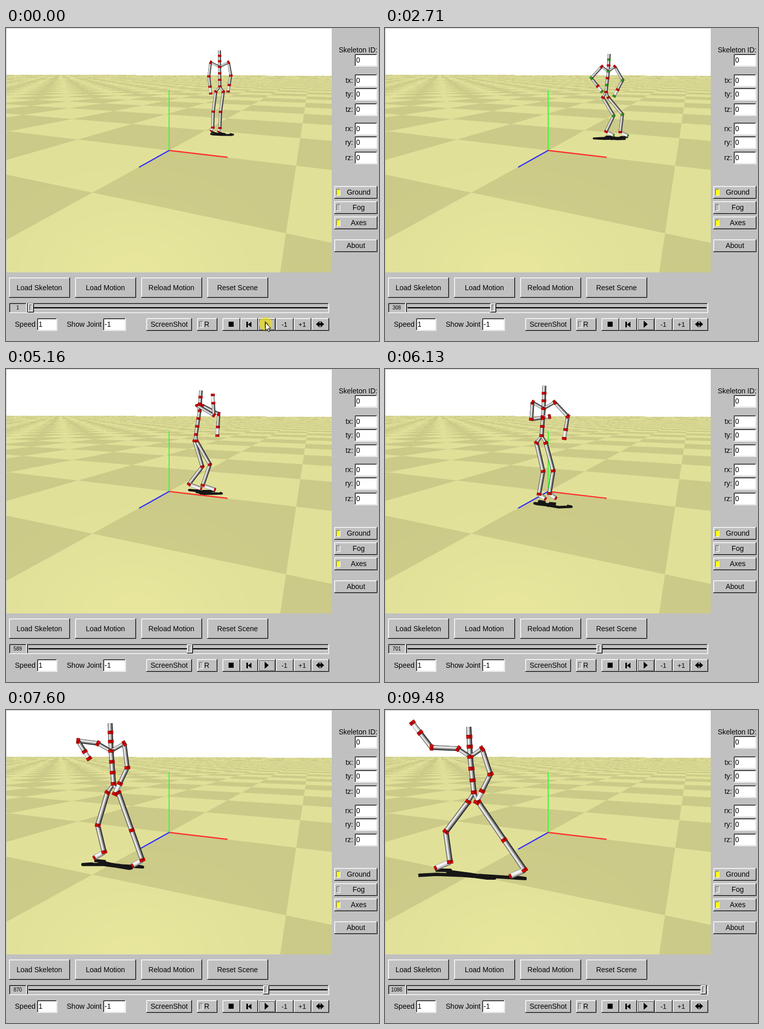
An HTML page with a canvas that plays this animation: 734x616 px, repeating every 9.68 s.

```html
<!DOCTYPE html>
<html lang="en">
<head>
<meta charset="utf-8">
<title>Skeleton player</title>
<style>
html, body { margin: 0; width: 734px; height: 616px; overflow: hidden; background: #c0c0c0; }
canvas, svg { position: absolute; left: 0; top: 0; display: block; }
text { font-family: "Liberation Sans", Arial, sans-serif; font-size: 14px; fill: #000; }
</style>
</head>
<body>
<canvas id="ground" width="734" height="616"></canvas>
<svg id="view" width="734" height="616" viewBox="0 0 734 616">
  <g fill="none" stroke-width="2">
    <path d="M321 241V122" stroke="#33ff33"/>
    <path d="M321 241L436 254.5" stroke="#ff3030" stroke-width="2.4"/>
    <path d="M321 241L262 274" stroke="#3030ff" stroke-width="2.4"/>
  </g>
  <svg x="1" y="1" width="640" height="480" viewBox="1 1 640 480"><g id="figure"></g></svg>
  <g id="panel"></g>
  <g id="thumb"></g>
  <text id="count" x="23" y="554" text-anchor="middle" style="font-size:10px"></text>
  <g id="cursor">
    <circle cx="511" cy="582" r="13" fill="#f0e000" opacity=".6"/>
    <path d="M510.5 579.5V595L514 591.8L516.6 597.8L519 596.8L516.4 591H521Z" fill="#fff" stroke="#000"/>
  </g>
</svg>
<script>
const $ = id => document.getElementById(id);
const LOOP = 9680, STEP_MS = 69.7, LAST = 136;
const mix = (a, b, p) => a + (b - a) * p;
const between = (a, b, p) => a.map((v, i) => mix(v, b[i], p));

// ---- checkered floor, seen through a plane projection ----
function drawGround() {
  const ctx = $("ground").getContext("2d");
  const a = 156.38, b = -210.91, c = 321, d = -14.43, e = -31.19, f = 241, g = -0.16395, h = -0.35244;
  const isDark = (x, y) => {
    const m = a - g * x, n = b - h * x, o = d - g * y, q = e - h * y;
    const det = m * q - n * o, r = x - c, s = y - f;
    const u = (r * q - n * s) / det, v = (m * s - r * o) / det;
    return (Math.floor(u) + Math.floor(v)) % 2 === 0 ? 1 : 0;
  };
  const img = ctx.createImageData(640, 480);
  for (let y = 0; y < 480; y++) for (let x = 0; x < 640; x++) {
    const k = (y * 640 + x) * 4, X = x + 1, Y = y + 1;
    let rgb = [255, 255, 255];
    if (Y > 91 + X / 256) {
      let dark = 0;
      for (const i of [.25, .75]) for (const j of [.25, .75]) dark += isDark(X + i, Y + j) / 4;
      const glow = 6 * Math.exp(-(((X - 250) / 190) ** 2) - ((Y - 480) / 130) ** 2);
      rgb = [mix(225, 203, dark) + glow, mix(224, 202, dark) + glow, mix(153, 136, dark) + glow * .6];
    }
    rgb.forEach((value, i) => img.data[k + i] = value);
    img.data[k + 3] = 255;
  }
  ctx.putImageData(img, 1, 1);
}

// ---- control panel ----
const UP = ["#fff", "#000", "#e0e0e0", "#808080"];
const DOWN = ["#808080", "#fff", "#000", "#d8d8d8"];
const rect = (x, y, w, h, fill) => `<rect x="${x}" y="${y}" width="${w}" height="${h}" fill="${fill}"/>`;
const label = (x, y, s, anchor = "start", size = 14) =>
  `<text x="${x}" y="${y}" text-anchor="${anchor}" style="font-size:${size}px">${s}</text>`;
const edge = (x, y, w, h, tl, br) =>
  `<g fill="none"><path d="M${x + .5} ${y + h}V${y + .5}H${x + w}" stroke="${tl}"/>` +
  `<path d="M${x} ${y + h - .5}H${x + w - .5}V${y}" stroke="${br}"/></g>`;
const box = (x, y, w, h, style, fill = "#c0c0c0") => rect(x, y, w, h, fill) +
  edge(x + 1, y + 1, w - 2, h - 2, style[2], style[3]) + edge(x, y, w, h, style[0], style[1]);
const slot = (x, y, w, h, fill = "#c0c0c0") => rect(x, y, w, h, fill) + edge(x, y, w, h, "#606060", "#fff");
const button = (x, y, w, h, s = "", cx = x + w / 2, size = 14) =>
  box(x, y, w, h, UP) + label(cx, y + h / 2 + 4.5, s, "middle", size);
const input = (x, y, w, s, name) => box(x, y, w, 25, DOWN, "#fff") + label(x + 3, y + 17, s) +
  label(x - 3, y + 17, name, "end");

function drawPanel() {
  let s = label(731, 48, "Skeleton ID:", "end") + input(686, 51, 45, "0", "");
  ["Load Skeleton", "Load Motion", "Reload Motion", "Reset Scene"].forEach((name, i) =>
    s += button(6 + 130 * i, 491, 120, 40, name, 65.5 + 130 * i));
  ["t", "r"].forEach((kind, i) => [0, 27, 57].forEach((dy, j) =>
    s += input(686, 91 + 95 * i + dy, 45, "0", kind + "xyz"[j] + ":")));
  ["Ground", "Fog", "Axes"].forEach((name, i) =>
    s += button(646, 311 + 30 * i, 85, 25, name, 694) + slot(650, 317 + 30 * i, 8, 13, i === 1 ? "#c0c0c0" : "#ff0"));
  s += button(646, 416, 85, 25, "About");
  s += box(6, 541, 35, 20, DOWN) + box(41, 541, 595, 20, DOWN) + slot(44, 549, 590, 4, "#000");
  s += input(61, 571, 40, "1", "Speed") + input(191, 571, 45, "-1", "Show Joint");
  s += button(276, 571, 90, 25, "ScreenShot");
  s += button(376, 571, 40, 25, "R", 395) + slot(380, 577, 8, 13);
  ["", "", "", "-1", "+1", ""].forEach((name, i) =>
    s += button(426 + 35 * i, 571, 35, 25, name, 443 + 35 * i, 13));
  s += rect(438, 578, 10, 10, "#000") + rect(473, 578, 3, 11, "#000");
  s += `<path d="M483 578V589L476 583.5ZM509 576L517 583L509 590ZM610 583L617 576.5V581H619V576.5L626 583L619 589.5V585H617V589.5Z"/>`;
  s += `<path d="M498 573.5H529M528.5 573V594M498 593.5H529M498.5 573V594" stroke="#000" stroke-dasharray="1"/>`;
  $("panel").innerHTML = s;
  $("thumb").innerHTML = box(-6, 542, 12, 18, UP) + slot(-3, 544, 6, 13);
}

// ---- skeleton: key points for pelvis, hands and ankles; the rest is derived ----
const keys = [
  { at: 0, yaw: -.1, pelvis: [421, 115], hands: [403, 129, 437, 125], feet: [407, 196, 421, 197] },
  { at: 39, yaw: .8, pelvis: [435, 126], hands: [427, 125, 451, 134], feet: [435, 204, 463, 205] },
  { at: 60, yaw: .8, pelvis: [366, 124], hands: [348, 136, 381, 135], feet: [326, 204, 368, 226] },
  { at: 74, yaw: 1.35, pelvis: [374, 129], hands: [407, 51, 416, 131], feet: [360, 227, 387, 229] },
  { at: 100, yaw: -.25, pelvis: [252, 133], hands: [270, 130, 281, 148], feet: [243, 263, 281, 273] },
  { at: 117, yaw: -.75, pelvis: [176, 156], hands: [40, 66, 184, 181], feet: [129, 297, 277, 315] },
  { at: LAST, yaw: -.75, pelvis: [175, 162], hands: [54, 25, 180, 182], feet: [128, 299, 275, 315] }
];

// Middle joint of a two-bone limb; flare is how much of the bend is seen.
function bend(from, to, upper, lower, flare) {
  const dx = to[0] - from[0], dy = to[1] - from[1], dist = Math.hypot(dx, dy) || 1;
  const total = Math.max(upper + lower, dist), part = upper / (upper + lower);
  const out = Math.sqrt(total * total - dist * dist) * Math.sqrt(part * (1 - part)) * flare / dist;
  return [from[0] + dx * part - dy * out, from[1] + dy * part + dx * out];
}

function poseAt(step) {
  let k = keys.length - 2;
  while (k && keys[k].at > step) k--;
  const A = keys[k], B = keys[k + 1], p = (step - A.at) / (B.at - A.at);
  const yaw = mix(A.yaw, B.yaw, p), side = Math.sin(yaw), front = Math.cos(yaw);
  const pelvis = between(A.pelvis, B.pelvis, p);
  const hands = between(A.hands, B.hands, p), feet = between(A.feet, B.feet, p);

  // size follows depth: lower on the floor means nearer
  const size = 37 + (Math.max(feet[1], feet[3]) - 197) * .255;
  const travel = Math.hypot(B.pelvis[0] - A.pelvis[0], B.pelvis[1] - A.pelvis[1]);
  const gait = Math.min(1, travel / 60) * Math.sin(Math.PI * p) * size;
  const phase = step * Math.PI / 7.5;

  const move = ([x, y], dx, dy) => [x + dx * size, y + dy * size];
  const chest = move(pelvis, side * .16, -1.04);
  const head = move(chest, side * .06, -.88);
  const arms = [], legs = [];
  [-1, 1].forEach((s, i) => {
    const swing = s * gait * Math.sin(phase), lift = gait * Math.max(0, s * Math.cos(phase));
    const shoulder = move(chest, s * .48 * front, -.24);
    const hand = [hands[2 * i] - swing * .25, hands[2 * i + 1] - lift * .1];
    // elbows hang outward and down
    const dx = hand[0] - shoulder[0], dy = hand[1] - shoulder[1];
    const sign = dx - s * dy > 0 ? 1 : -1;
    const elbow = bend(shoulder, hand, .8 * size, .97 * size, sign * Math.sqrt(Math.abs(side)));
    arms.push([chest, shoulder, elbow, between(elbow, hand, .6), hand]);

    const hip = move(pelvis, s * .2 * front - .02, .28);
    const ankle = [feet[2 * i] + swing * .35 * side, feet[2 * i + 1] - lift * .22];
    const knee = bend(hip, ankle, 1.2 * size, .95 * size, -side);
    legs.push([pelvis, hip, knee, ankle, move(ankle, side * .58 - .03, .18)]);
  });
  return { size, feet, arms, legs, spine: [pelvis, chest, head] };
}

const line = (x1, y1, x2, y2, color, w) =>
  `<path d="M${x1.toFixed(1)} ${y1.toFixed(1)}L${x2.toFixed(1)} ${y2.toFixed(1)}" stroke="${color}" stroke-width="${w.toFixed(1)}"/>`;

// Shaded tube, lit from the left.
function tube([x1, y1], [x2, y2], w, pale) {
  const len = Math.hypot(x2 - x1, y2 - y1) || 1;
  let nx = (y2 - y1) / len, ny = (x1 - x2) / len;
  if (nx + ny * .3 > 0) { nx = -nx; ny = -ny; }
  const layers = pale ? [["#777", 1, 0], ["#c8c8c8", .8, .08], ["#f4f4f4", .45, .16]]
    : [["#2c2c2c", 1, 0], ["#707070", .78, .08], ["#acacac", .54, .13], ["#e8e8e8", .3, .18]];
  return layers.map(([color, size, off]) => {
    const ox = nx * off * w, oy = ny * off * w;
    return line(x1 + ox, y1 + oy, x2 + ox, y2 + oy, color, w * size);
  }).join("");
}

// Coloured ring across the end of a bone.
function ring([x, y], [px, py], w, color) {
  const len = Math.hypot(x - px, y - py) || 1;
  const dx = (x - px) / len, dy = (y - py) / len, r = w * .58;
  const across = (c, size) => line(x - dy * r, y + dx * r, x + dy * r, y - dx * r, c, w * size);
  return across("#600000", .7) + across(color, .52) +
    line(x - dx * w * .1, y - dy * w * .1, x + dy * r * .6, y - dx * r * .6, "#300", w * .14);
}

// Light from above flattens every chain onto the floor between the feet.
function shadowOf({ size, feet, arms, legs, spine }) {
  const [x1, y1, x2, y2] = feet;
  const fall = ([x, y]) => {
    const p = Math.min(1, Math.max(0, (x - x1) / (x2 - x1 || 1)));
    const floor = mix(y1, y2, p) + size * .24;
    const height = Math.max(0, floor - y);
    return [x + height * .04, floor + height * .035].map(v => v.toFixed(1)).join(" ");
  };
  return `<g fill="none" stroke="#161616" stroke-linejoin="round" stroke-width="${size * .1}">` +
    [...arms, ...legs, spine].map(c => `<path d="M${c.map(fall).join("L")}"/>`).join("") + "</g>";
}

function drawFigure(step) {
  const body = poseAt(step), w = body.size * .152;
  const green = step > 0 && step % 3 === 0;
  let bones = "", rings = "", n = 0;
  const dot = (point, from, size = 1) =>
    rings += ring(point, from, w * size, green && n++ % 2 ? "#10c020" : "#d80808");
  const chain = (points, isLeg) => {
    for (let i = 1; i < points.length; i++) {
      const a = points[i - 1], b = points[i], end = i === 4;
      bones += tube(a, b, w * (i === 1 ? .75 : isLeg ? 1.05 : .92), end);
      dot(b, a, end && isLeg ? .7 : 1);
    }
  };
  const [left, right] = body.arms;
  body.legs.forEach(leg => chain(leg, true));
  for (let i = 1; i < 3; i++) {
    const a = body.spine[i - 1], b = body.spine[i];
    bones += tube(a, b, w);
    for (const p of [0, .34, .67]) dot(between(a, b, p), b);
  }
  chain(right);
  chain(left);
  $("figure").innerHTML = shadowOf(body) + bones + rings;
}

let shown = -1;
function update(t) {
  const step = Math.min(LAST, Math.floor(t / STEP_MS + .25));
  if (step === shown) return;
  shown = step;
  drawFigure(step);
  const count = Math.max(1, Math.round(8.025 * step - 5));
  $("count").textContent = count;
  $("thumb").setAttribute("transform", `translate(${Math.round(49 + (count - 1) * .5327)} 0)`);
  $("cursor").setAttribute("transform", `translate(0 ${Math.max(0, step - 3) * 4})`);
  $("cursor").style.display = step > 8 ? "none" : "";
}

drawGround();
drawPanel();
update(0);
const start = performance.now();
requestAnimationFrame(function tick() {
  update((performance.now() - start) % LOOP);
  requestAnimationFrame(tick);
});
</script>
</body>
</html>
```
